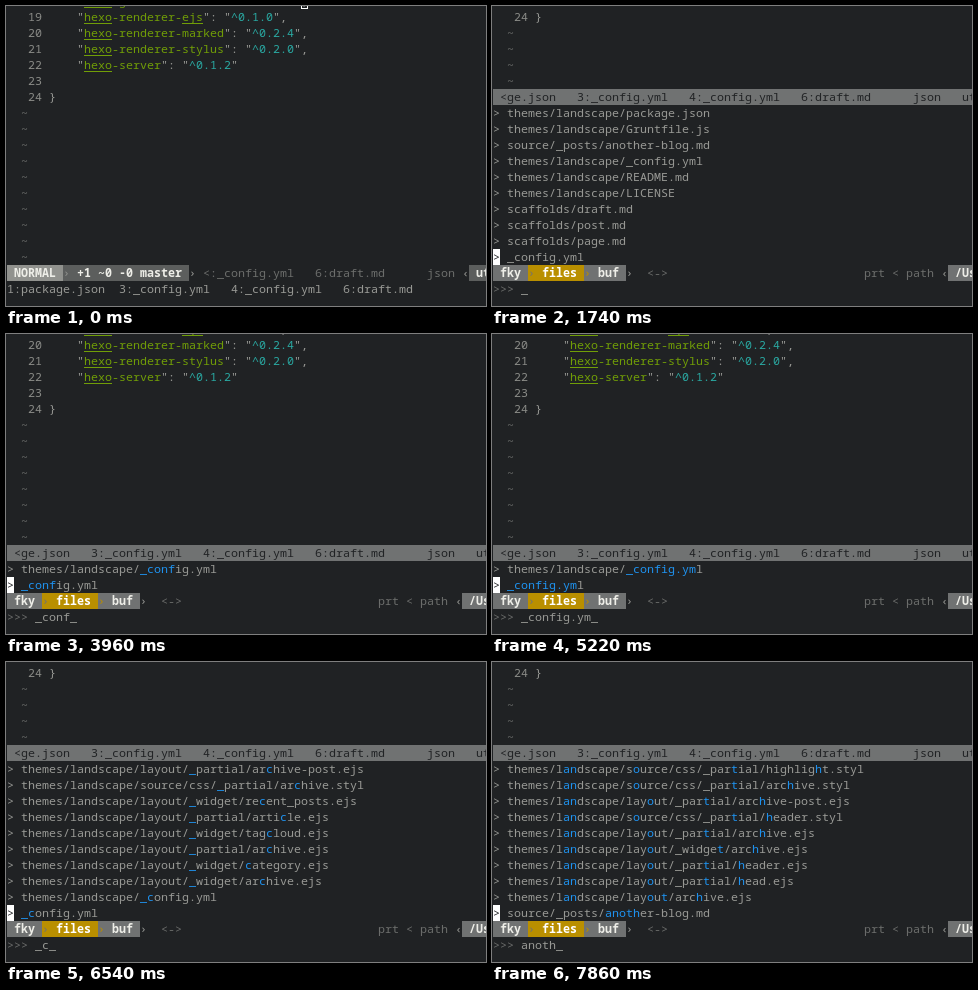
An HTML page with a canvas for the animation above (8 s loop, 480 px wide and 300 px high).

```html
<!DOCTYPE html>
<html lang="en">
<head>
<meta charset="utf-8">
<title>Fuzzy file finder</title>
<style>
html, body { margin: 0; width: 100%; height: 100%; overflow: hidden; background: #202224; }
canvas { display: block; }
</style>
</head>
<body>
<canvas id="screen" width="480" height="300"></canvas>
<script>
const ctx = document.getElementById('screen').getContext('2d');
const LOOP = 8000, CELL = 7, ROW = 16, LEFT = 1, TOP = 3;
const STATUS = 16, PROMPT = 17;
const C = {
  bg: '#202224', text: '#999a96', dim: '#6c6e6c', number: '#8b8c88', bar: '#707272',
  mode: '#91928e', branch: '#5c5e5d', gold: '#b98f00', light: '#eeeee8',
  green: '#719e07', cyan: '#2aa9a2', match: '#1f93f0', white: '#ffffff'
};

const theme = 'themes/landscape/';
const layout = theme + 'layout/';
const partial = layout + '_partial/';
const widget = layout + '_widget/';
const css = theme + 'source/css/';
const files = [
  '_config.yml', 'scaffolds/page.md', 'scaffolds/post.md', 'scaffolds/draft.md',
  theme + 'LICENSE', theme + 'README.md', theme + '_config.yml',
  'source/_posts/another-blog.md', theme + 'Gruntfile.js', theme + 'package.json',
  'source/images/vim_learning.jpg', 'source/_posts/ESENS-Nu-shit.md',
  'source/_posts/spf13-vim-Distribution.md',
  layout + 'tag.ejs', layout + 'post.ejs', layout + 'page.ejs', layout + 'index.ejs',
  layout + 'layout.ejs', layout + 'archive.ejs', layout + 'category.ejs',
  widget + 'tag.ejs', partial + 'head.ejs', partial + 'footer.ejs', css + '_extend.styl',
  partial + 'header.ejs', widget + 'archive.ejs', widget + 'category.ejs',
  partial + 'archive.ejs', widget + 'tagcloud.ejs', partial + 'article.ejs',
  css + '_partial/header.styl', widget + 'recent_posts.ejs',
  css + '_partial/archive.styl', partial + 'archive-post.ejs',
  css + '_partial/highlight.styl'
];

const deps = {
  18: ['generator-index', '0.1.0'], 19: ['renderer-ejs', '0.1.0'],
  20: ['renderer-marked', '0.2.4'], 21: ['renderer-stylus', '0.2.0'],
  22: ['server', '0.1.2']
};

// [start time, typed query]; null is the plain editor
const steps = [
  [0, null], [60, ''], [1200, null], [1740, ''], [3300, '_'], [3600, '_c'], [3660, '_co'],
  [3840, '_con'], [3960, '_conf'], [4080, '_confi'], [4140, '_config'], [4620, '_config.'],
  [5040, '_config.y'], [5220, '_config.ym'], [5640, '_config.y'], [5760, '_config.'],
  [5820, '_config'], [6000, '_confi'], [6120, '_conf'], [6300, '_con'], [6420, '_co'],
  [6540, '_c'], [6660, '_'], [6840, ''], [7380, 'a'], [7440, 'an'], [7620, 'ano'],
  [7800, 'anot'], [7860, 'anoth']
];

// Fuzzy match from the end of the path; gives matched positions or null
function fuzzy(path, query) {
  const hits = [];
  let at = path.length;
  for (const ch of [...query].reverse()) {
    at = at > 0 ? path.lastIndexOf(ch, at - 1) : -1;
    if (at < 0) return null;
    hits.unshift(at);
  }
  return hits;
}

function search(query) {
  const span = h => h.length ? h[h.length - 1] - h[0] : 0;
  const rank = p => p.length + (p.includes('_extend') ? 3 : 0);
  return files
    .map(path => ({ path, hits: fuzzy(path, query) }))
    .filter(f => f.hits)
    .sort((a, b) => rank(a.path) - rank(b.path) || span(a.hits) - span(b.hits))
    .slice(0, 10);
}

const x = col => LEFT + col * CELL;
const y = row => TOP + row * ROW;

function fill(col, row, cols, color) {
  ctx.fillStyle = color;
  ctx.fillRect(x(col), y(row), cols * CELL, ROW);
}

function write(col, row, str, color, weight = 500) {
  ctx.font = `${weight} 11.667px "Noto Sans Mono", "DejaVu Sans Mono", monospace`;
  ctx.fillStyle = color;
  ctx.fillText(str, x(col), y(row) + 12);
  return col + str.length;
}

function underline(col, row, cols) {
  ctx.fillStyle = C.green;
  ctx.fillRect(x(col), y(row) + 14, cols * CELL, 1);
}

function dependency(line, row) {
  const [name, version] = deps[line];
  let col = write(10, row, '"', C.text);
  underline(col, row, 4);
  col = write(col, row, 'hexo-' + name, C.green);
  if (name.endsWith('ejs')) underline(col - 3, row, 3);
  col = write(col, row, '": "', C.text);
  col = write(col, row, '^' + version, C.cyan);
  write(col, row, line < 22 ? '",' : '"', C.text);
}

function buffer(first, rows) {
  for (let row = -1; row < rows; row++) {
    const line = first + row;
    if (line > 24) {
      write(2, row, '~', C.dim);
      continue;
    }
    write(3, row, String(line), C.number);
    if (deps[line]) dependency(line, row);
    if (line === 24) write(6, row, '}', C.text);
  }
}

function editor(since) {
  buffer(19, STATUS);
  ctx.strokeStyle = C.white;
  ctx.lineWidth = 1;
  ctx.strokeRect(x(42) + 0.5, y(-1) + 0.5, CELL - 1, ROW - 1);

  fill(0, STATUS, 8, C.mode);
  write(1, STATUS, 'NORMAL', C.light, 700);
  fill(8, STATUS, 18, C.branch);
  write(8, STATUS, '›', C.mode);
  write(10, STATUS, '+1 ~0 -0 master', C.light, 700);
  write(26, STATUS, '›', C.text);
  write(28, STATUS, '<:_config.yml', C.dim);
  write(44, STATUS, '6:draft.md', C.dim);
  write(60, STATUS, 'json', C.dim);
  write(65, STATUS, '‹', C.text);
  fill(66, STATUS, 3, C.branch);
  write(67, STATUS, 'utf', C.light, 700);

  if (since < 60) return;
  ['1:package.json', '3:_config.yml', '4:_config.yml', '6:draft.md']
    .forEach((name, i) => write(i * 16, PROMPT, name, C.text));
}

function inactiveBar(row) {
  fill(0, row, 69, C.bar);
  [[1, '<ge.json'], [12, '3:_config.yml'], [28, '4:_config.yml'], [44, '6:draft.md'],
    [60, 'json'], [67, 'utf']].forEach(([col, str]) => write(col, row, str, C.bg));
}

function finderBar() {
  fill(0, STATUS, 5, C.bar);
  write(1, STATUS, 'fky', C.light, 700);
  fill(5, STATUS, 8, C.gold);
  write(5, STATUS, '›', C.bar);
  write(7, STATUS, 'files', C.white, 700);
  fill(13, STATUS, 6, C.bar);
  write(13, STATUS, '›', C.gold);
  write(15, STATUS, 'buf', C.light, 700);
  write(19, STATUS, '›', C.text);
  write(22, STATUS, '<->', C.dim);
  write(53, STATUS, 'prt < path', C.dim);
  write(64, STATUS, '‹', C.text);
  fill(65, STATUS, 4, C.bar);
  write(66, STATUS, '/Us', C.light, 700);
}

function finder(query) {
  const found = search(query);
  const barRow = STATUS - 1 - found.length;
  buffer(19 + found.length / 2, barRow);
  inactiveBar(barRow);
  found.forEach(({ path, hits }, i) => {
    const row = STATUS - 1 - i;
    if (i === 0) fill(0, row, 1, C.white);
    write(0, row, '>', i === 0 ? C.bg : C.text);
    [...path].forEach((ch, k) => write(2 + k, row, ch, hits.includes(k) ? C.match : C.text));
  });
  finderBar();
  write(0, PROMPT, '>>>', C.dim);
  write(write(4, PROMPT, query, C.text), PROMPT, '_', C.text);
}

function draw(t) {
  const [start, query] = steps.filter(s => s[0] <= t).pop();
  ctx.fillStyle = C.bg;
  ctx.fillRect(0, 0, 480, 300);
  if (query === null) editor(start ? t - start : Infinity);
  else finder(query);
}

let origin;
function tick(now) {
  if (origin === undefined) origin = now;
  draw(Math.max(0, now - origin) % LOOP);
  requestAnimationFrame(tick);
}
draw(0);
requestAnimationFrame(tick);
</script>
</body>
</html>
```
